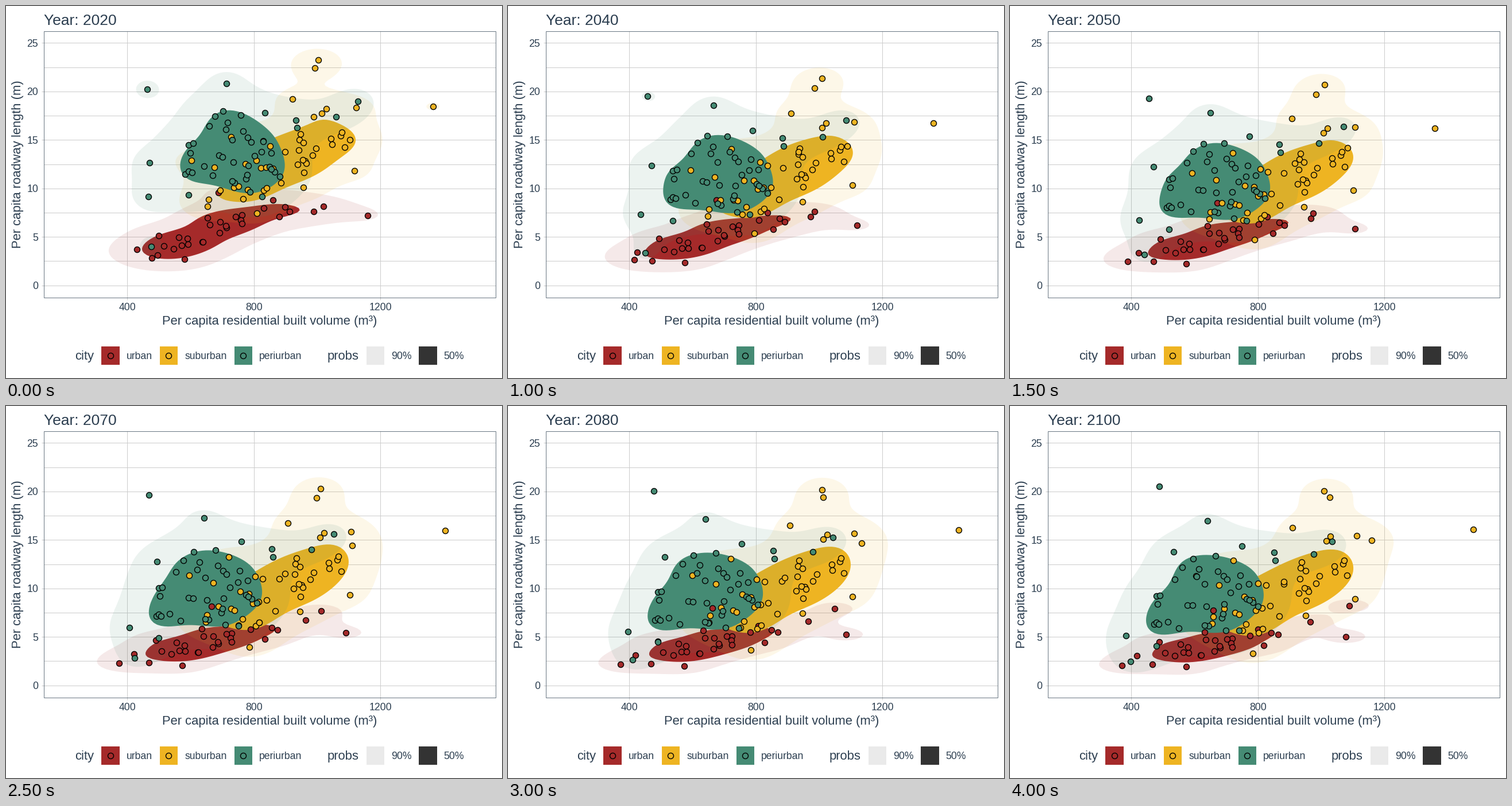
Animation of 864x648 px, one loop 4500 ms. Source, as a matplotlib script:

```python
import numpy as np
import matplotlib.pyplot as plt
from matplotlib.animation import FuncAnimation
from matplotlib.patches import Rectangle

W, H, DPI = 864, 648, 100
PX = 72 / DPI                      # points per pixel
INK, GRID = "#2c3e50", "#cccccc"
RED, GOLD, GREEN = "#a52a2a", "#eeb422", "#458b74"
LEFT, RIGHT, TOP, BOTTOM = 66, 853, 43.5, 507.5

plt.rcParams["font.family"] = "Liberation Sans"

# Point positions in 2060 as x, y in stage pixels
URBAN = [
    224, 431, 250, 446, 302, 425, 271, 426, 262, 407, 288, 431, 297, 411,
    307, 450, 311, 415, 312, 425, 343, 385, 335, 426, 336, 426, 346, 398,
    362, 416, 363, 397, 360, 345, 373, 409, 397, 391, 372, 406, 395, 399,
    387, 392, 397, 406, 431, 383, 446, 371, 467, 380, 476, 385, 456, 400,
    522, 372, 597, 391]
SUBURBAN = [
    316, 294, 346, 374, 348, 362, 369, 346, 359, 306, 387, 259, 391, 349,
    398, 351, 408, 318, 405, 377, 412, 365, 424, 321, 435, 290, 448, 295,
    431, 337, 441, 334, 436, 376, 442, 370, 454, 332, 425, 413, 469, 352,
    476, 296, 490, 200, 505, 261, 503, 271, 512, 328, 511, 276, 500, 314,
    514, 308, 502, 289, 516, 312, 511, 354, 509, 306, 534, 286, 545, 225,
    560, 269, 561, 279, 552, 217, 600, 215, 575, 264, 577, 258, 582, 284,
    597, 325, 528, 298]
PERIURBAN = [
    222, 378, 274, 323, 272, 396, 272, 309, 268, 358, 302, 281, 314, 261,
    278, 308, 272, 355, 276, 358, 332, 247, 338, 278, 291, 354, 323, 327,
    309, 366, 342, 265, 331, 328, 373, 272, 382, 281, 351, 292, 369, 245,
    388, 288, 413, 232, 357, 366, 351, 364, 379, 354, 354, 331, 394, 311,
    407, 302, 410, 283, 386, 376, 424, 300, 421, 325, 408, 379, 440, 340,
    431, 332, 425, 328, 465, 246, 467, 260, 534, 245, 383, 330, 381, 347]


class City:
    """Points that drift together, plus a few strays with paths of their own.

    early and late hold the dx and dy profiles, over evenly spaced x,
    that lead from 2060 to 2020 and to 2100.
    """

    def __init__(self, color, points, span, early, late, strays):
        self.color = color
        mid = np.reshape(points, (-1, 2)).astype(float)
        knots = np.linspace(*span, 6)

        def drift(profiles):
            return np.column_stack(
                [np.interp(mid[:, 0], knots, p) for p in profiles])

        keys = np.array([mid + drift(early), mid, mid + drift(late)])
        paths = np.reshape(strays, (-1, 3, 2)).transpose(1, 0, 2)
        self.keys = np.concatenate([keys, paths], axis=1)

    def at(self, year):
        """Ease out from each key year (2020, 2060, 2100) to the next."""
        i = 0 if year < 2060 else 1
        u = (year - 2020 - 40 * i) / 40
        a, b = self.keys[i], self.keys[i + 1]
        return a + (b - a) * (1 - (1 - u) ** 1.6)


CITIES = [
    City(RED, URBAN, (230, 600),
         ([4, 4, 12, 20, 14, 34], [-7, -8, -24, -34, -13, -27]),
         ([-3, 0, -8, -15, 2, -13], [4, 4, 13, 18, 3, 11]),
         [(264, 434, 198, 446, 195, 452), (553, 349, 525, 362, 591, 348)]),
    City(GOLD, SUBURBAN, (320, 600),
         ([7, 3, 13, 9, 5, 10], [-25, -25, -56, -38, -38, -38]),
         ([8, 3, -3, 2, 6, 4], [2, 8, 19, 12, 10, 11]),
         [(599, 233, 587, 249, 630, 234), (538, 108, 532, 160, 557, 159),
          (544, 94, 548, 142, 547, 148), (536, 193, 491, 284, 477, 306),
          (744, 175, 740, 218, 807, 215)]),
    City(GREEN, PERIURBAN, (220, 580),
         ([25, 54, 40, 37, 45, 34], [-45, -75, -56, -42, -55, -48]),
         ([-20, -16, -11, -8, 0, -14], [22, 22, 17, 9, 10, 18]),
         [(246, 145, 242, 163, 260, 140), (250, 273, 250, 281, 285, 254),
          (384, 135, 345, 192, 344, 200), (253, 419, 232, 435, 210, 445),
          (613, 166, 577, 215, 561, 236)]),
]

GX = np.linspace(101.5, 817, 120)
GY = np.linspace(64.5, 487, 120)


def kernel(values, grid):
    """Gaussian kernels with the normal reference bandwidth."""
    q1, q3 = np.percentile(values, [25, 75])
    spread = min(values.std(ddof=1), (q3 - q1) / 1.34)
    bw = 1.06 * spread * len(values) ** -0.2
    return np.exp(-0.5 * ((grid[:, None] - values) / bw) ** 2)


def density(pts):
    f = kernel(pts[:, 1], GY) @ kernel(pts[:, 0], GX).T
    return f / f.sum()


def hdr_level(f, prob):
    """Density above which the given share of the mass lies."""
    s = np.sort(f.ravel())[::-1]
    return s[np.searchsorted(np.cumsum(s), prob)]


fig = plt.figure(figsize=(W / DPI, H / DPI), dpi=DPI, facecolor="white")
ax = fig.add_axes([0, 0, 1, 1])
ax.set_xlim(0, W)
ax.set_ylim(H, 0)
ax.axis("off")


def label(x, y, text, size, **kw):
    kw.setdefault("va", "baseline")
    return ax.text(x, y, text, fontsize=size * PX, color=INK, **kw)


def line(x, y):
    ax.plot(x, y, color=GRID, lw=PX, zorder=0.5, solid_capstyle="butt")


def dots(x, y, color):
    return ax.plot(x, y, "o", ms=10 * PX, mfc=color, mec="black",
                   mew=1.4 * PX, zorder=3)[0]


def draw_static():
    for v in np.arange(0, 25.1, 2.5):
        y = 486.7 - 16.89 * v
        major = v % 5 == 0
        line([LEFT - 4 if major else LEFT, RIGHT], [y, y])
        if major:
            label(56, y + 6.3, f"{v:.0f}", 17.6, ha="right")
    for v in (400, 800, 1200):
        x = 211.3 + 0.551 * (v - 400)
        line([x, x], [TOP, BOTTOM + 4])
        label(x, 530, str(v), 17.6, ha="center")
    ax.add_patch(Rectangle((LEFT, TOP), RIGHT - LEFT, BOTTOM - TOP, fill=False,
                           ec=INK, lw=0.7 * PX, zorder=2))
    label(459.5, 555, "Per capita residential built volume (m³)", 22,
          ha="center")
    label(20.5, 275.5, "Per capita roadway length (m)", 22, rotation=90,
          ha="center", va="center")

    label(120.5, 616, "city", 22)
    label(559.5, 616, "probs", 22)
    entries = [(166, RED, "urban"), (267.5, GOLD, "suburban"),
               (397.5, GREEN, "periurban"),
               (627.5, "#eaeaea", "90%"), (719, "#333333", "50%")]
    for i, (x, color, name) in enumerate(entries):
        ax.add_patch(Rectangle((x, 593), 31.5, 32, fc=color, ec="none"))
        label(x + 43.5, 615, name, 17.6)
        if i < 3:
            dots([x + 15.7], [609], color)


draw_static()
title = label(65.5, 33, "", 26.4)
live = []


def clear():
    for artist in live:
        artist.remove()
    live.clear()
    return []


def update(i):
    clear()
    year = 2020 + 10 * i
    title.set_text(f"Year: {year}")
    for city in CITIES:
        pts = city.at(year)
        f = density(pts)
        for prob, alpha in ((0.9, 0.1), (0.5, 1)):
            live.append(ax.contourf(
                GX, GY, f, levels=[hdr_level(f, prob), f.max() * 1.01],
                colors=[city.color], alpha=alpha, antialiased=True, zorder=1))
        live.append(dots(pts[:, 0], pts[:, 1], city.color))
    return live


anim = FuncAnimation(fig, update, frames=9, init_func=clear, interval=500,
                     repeat=True, repeat_delay=0, blit=False)
plt.show()
```
